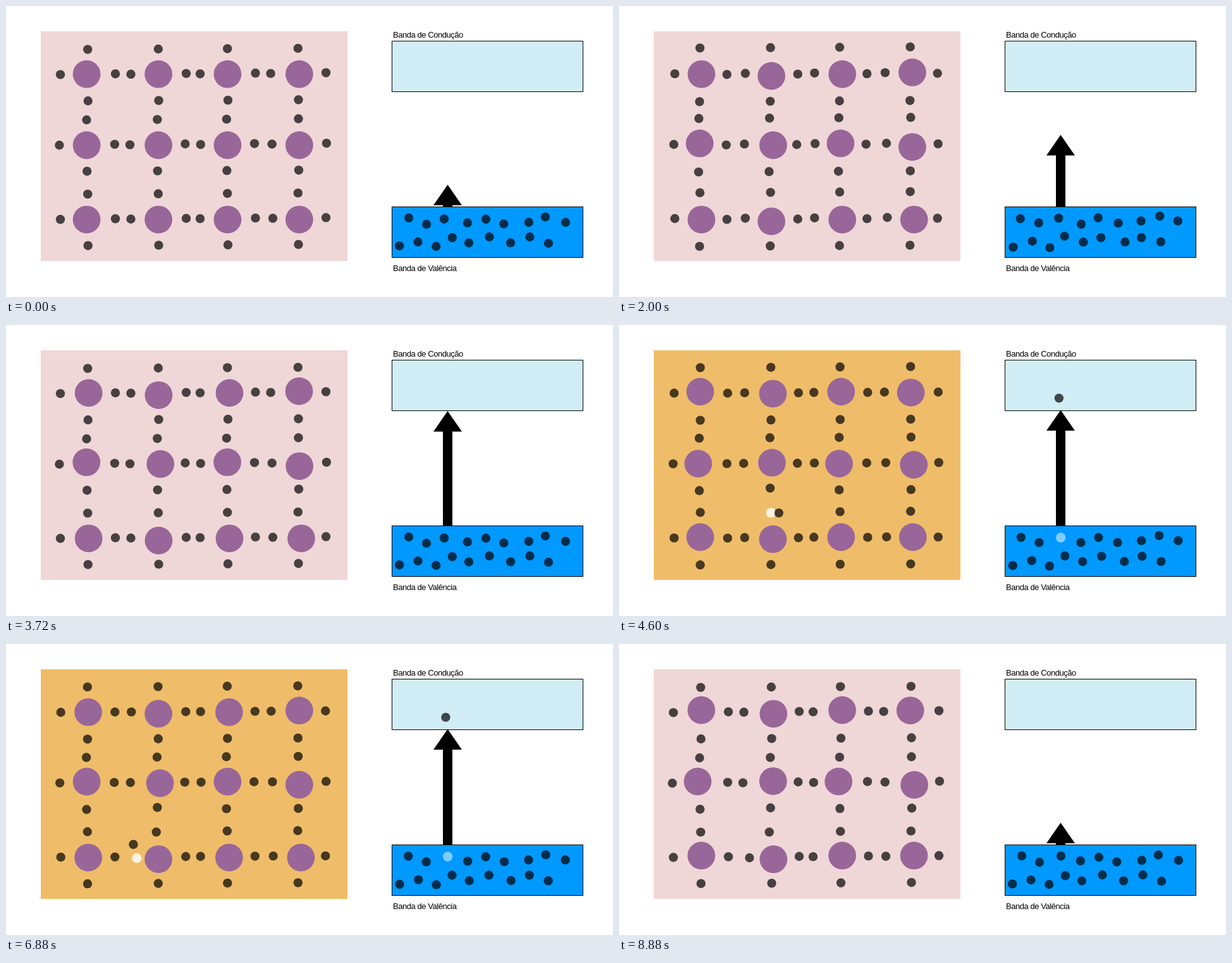
These frames come from a looping animation (960 by 460 pixels, 8920 ms). An HTML page:

```html
<!DOCTYPE html>
<html lang="pt">
<head>
<meta charset="utf-8">
<title>Bandas de energia</title>
<style>
  html, body { margin: 0; width: 100%; height: 100%; overflow: hidden; background: #fff; }
  svg { display: block; }
  text { font: 13px "Liberation Sans", Arial, sans-serif; letter-spacing: -0.45px; }
</style>
</head>
<body>
<svg id="stage" width="960" height="460" viewBox="0 0 960 460"></svg>
<script>
const STEP = 40, FRAMES = 223;
const EXCITE = 94, HOP = 140, HOP_END = 165, RECOMBINE = 185, COOL = 200;

const stage = document.getElementById('stage');

function add(tag, attrs, text) {
  const node = document.createElementNS('http://www.w3.org/2000/svg', tag);
  set(node, attrs);
  if (text) node.textContent = text;
  return stage.appendChild(node);
}
function set(node, attrs) {
  for (const key in attrs) node.setAttribute(key, attrs[key]);
}
const place = (node, [x, y]) => set(node, { cx: x.toFixed(2), cy: y.toFixed(2) });
const show = (node, visible) => set(node, { visibility: visible ? 'visible' : 'hidden' });
const electron = () => add('circle', { r: 7.2, fill: '#000', 'fill-opacity': 0.7 });
const hole = (cx, cy, opacity) => add('circle', { cx, cy, r: 7.7, fill: '#fff', 'fill-opacity': opacity });

// Linear interpolation through keys of the form [frame, ...values]
function along(keys, f) {
  const next = keys.findIndex(k => k[0] > f);
  if (next === 0) return keys[0].slice(1);
  if (next < 0) return keys[keys.length - 1].slice(1);
  const a = keys[next - 1], b = keys[next], p = (f - a[0]) / (b[0] - a[0]);
  return a.slice(1).map((v, i) => v + (b[i + 1] - v) * p);
}

// Vibration of electrons: t(op), l(eft), b(ottom), r(ight), n(ear)
const SWING = { t: [-1.3, -2.4], l: [2.5, -1.4], b: [-2.5, 1.3], r: [-2.5, 1.1], n: [1.3, 2.2] };
const WAVE = [[0, 0], [46, 1], [93, 0], [139, 1], [185, 0], [200, 0.33], [222, 0]];
const swing = ([x, y], kind, w) => [x + SWING[kind][0] * w, y + SWING[kind][1] * w];

// Crystal lattice
const COLS = [127.6, 241.1, 350.4, 463.9], ROWS = [107.7, 220, 337.6];
const ATOM_KINDS = 'abaccacbabaa';
const ATOM_TURN = { a: (u, v) => [u, -v], b: (u, v) => [v, u], c: (u, v) => [-v, -u] };
const ATOM_LOOP = [[0, 0, 0], [10, 3.1, 0], [20, 3, 3.2], [30, 1.2, 3.2], [41, 0, 0]];

const outerX = {
  t: [129.2, 240.8, 350.2, 461.8], b: [129.7, 241.5, 351, 462.5],
  l: [86, 197.5, 307, 418.6], r: [173, 285, 394.5, 506]
};
const middleX = {
  t: [127.5, 239.3, 348.9, 462.5], b: [128.2, 239.7, 349.4, 463],
  l: [84.4, 196, 307.8, 420.7], r: [171.9, 283.4, 393, 506.9]
};
const BOND_Y = { t: [68.6, 180, 297.4], b: [150, 261.2, 378.7], l: [108.4, 220, 337.3], r: [107.2, 218.6, 336.3] };

const panel = add('rect', { x: 55, y: 40, width: 485, height: 363 });
const atoms = [...ATOM_KINDS].map((kind, i) => ({
  kind, home: [COLS[i % 4], ROWS[i >> 2]], node: add('circle', { r: 21.9, fill: '#996699' })
}));

const siteHole = hole(240.4, 296.8, 0.8);
const nextHole = hole(206.9, 338.5, 0.8);

const bonds = [];
for (let row = 0; row < 3; row++) {
  for (let col = 0; col < 4; col++) {
    for (const kind of 'tblr') {
      let x = (row === 1 ? middleX : outerX)[kind][col];
      if (row === 2 && col === 3 && kind === 'l') x += 3.4;
      bonds.push({ id: kind + row + col, kind, home: [x, BOND_Y[kind][row] - 0.58 * col], node: electron() });
    }
  }
}

const FREE_PATH = [[EXCITE, 240.6, 297], [139, 266.8, 297.2], [172, 201.4, 316.8], [RECOMBINE, 206.4, 338]];
const HOP_PATH = [[HOP, 200, 335.2], [HOP_END, 237.7, 297.3]];

function bondPosition({ id, kind, home }, f, w) {
  if (id === 't21' && f >= EXCITE) return along(FREE_PATH, f);
  if (id === 'l21' && f >= HOP) return along(HOP_PATH, f);
  if (id === 'b11' && f >= EXCITE) return swing([home[0], home[1] - 1.6], 't', w);
  return swing(home, kind, w);
}

// Energy bands
const band = (y, fill) => add('rect', {
  x: 610.5, y, width: 302, height: 80, fill, stroke: '#000', 'stroke-width': 1
});
band(55.5, '#d1edf5');
band(317.5, '#0099ff');
add('text', { x: 612, y: 50 }, 'Banda de Condução');
add('text', { x: 612, y: 419 }, 'Banda de Valência');
const arrow = add('path', { fill: '#000' });

const VALENCE_KINDS = 'btlntltltnlntlblbt';
const VALENCE = [
  [637, 335], [665, 345], [693, 336.7], [729.8, 342.8], [759, 337], [787.3, 344.5],
  [826.8, 342], [853, 333.5], [885, 342], [622.2, 379.2], [651.5, 373], [680.2, 380],
  [705.8, 366.2], [732, 374.5], [764.5, 365], [798, 374.4], [828.5, 365], [858, 375]
];
const valence = VALENCE.map((home, i) => ({ home, kind: VALENCE_KINDS[i], node: electron() }));
const jumper = valence[2];
const bandHole = hole(698.6, 336, 0.5);
const conduction = electron();

function draw(f) {
  const [w] = along(WAVE, f);
  const excited = f >= EXCITE && f < RECOMBINE;
  const hot = f >= EXCITE && f < COOL;

  set(panel, { fill: hot ? '#efbd69' : '#efd7d7' });
  const [u, v] = along(ATOM_LOOP, (f < COOL ? f : f - COOL) % 41);
  for (const { kind, home, node } of atoms) {
    const [dx, dy] = ATOM_TURN[kind](u, v);
    place(node, [home[0] + dx, home[1] + dy]);
  }
  for (const bond of bonds) place(bond.node, bondPosition(bond, f, w));
  show(siteHole, f >= EXCITE && f < HOP_END);
  show(nextHole, f >= HOP && f < RECOMBINE);

  for (const { home, kind, node } of valence) place(node, swing(home, kind, w));
  if (f >= RECOMBINE) place(jumper.node, [699 + w, 335.2]);
  show(jumper.node, !excited);
  show(bandHole, excited);
  show(conduction, excited);
  place(conduction, swing([694.8, 116.2], 'l', w * 0.9));

  const tip = f >= RECOMBINE ? 282.5 : 282.5 - 1.574 * Math.min(f, EXCITE);
  const base = tip + 32.5;
  set(arrow, { d: `M698.5 ${tip}L721 ${base}H706V317.5H691V${base}H676Z` });
}

function tick(now) {
  draw(Math.floor(now / STEP) % FRAMES);
  requestAnimationFrame(tick);
}
draw(0);
requestAnimationFrame(tick);
</script>
</body>
</html>
```
